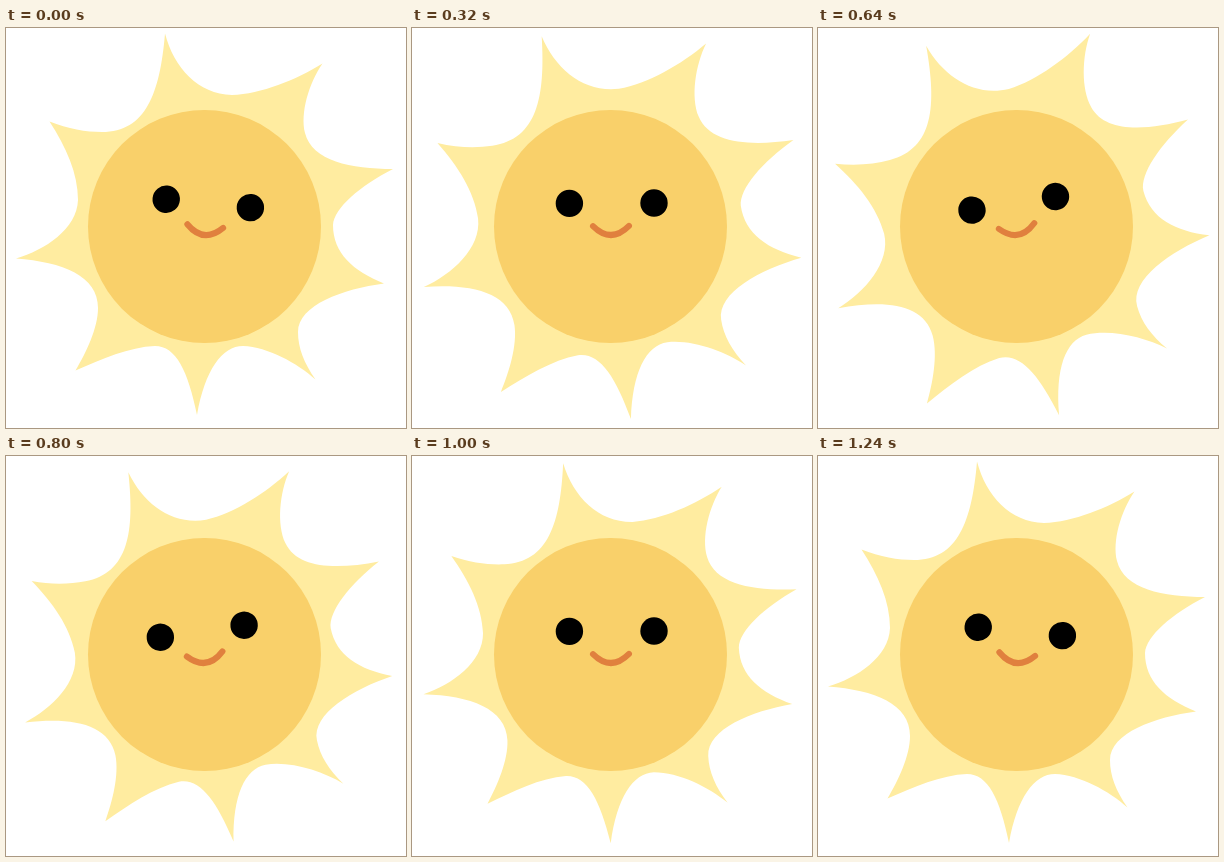
Write an HTML page that moves like this. It is 400 by 400 pixels and loops after 1.28 s.

```html
<!DOCTYPE html>
<html lang="en">
<head>
<meta charset="utf-8">
<title>Smiling sun</title>
<style>
  html, body { margin: 0; width: 100%; height: 100%; overflow: hidden; background: #fff; }
  svg { display: block; width: 100%; height: 100%; }
</style>
</head>
<body>
<svg viewBox="0 0 400 400">
  <path id="rays" fill="#ffeca0" d="M159 5.5
    C168 40 192 66 226 67 C255 66 290 52 316.5 35.5
    C303 55 294 85 299 105 C306 133 345 141 387 141
    C354 158 328 180 327 197 C327 225 347 243 378 255.5
    C337 261 292 277 292 304 C292 320 298 335 309.5 351.5
    C291 335 262 319 237 318 C216 318 199 342 191 387
    C182 343 170 318 149 318 C123 319 96 331 69.5 342.5
    C80 325 92 300 92 280 C92 248 57 234 10 230.5
    C39 222 71 201 72 172 C72 145 60 119 43.5 93.5
    C62 101 80 104 96 104 C140 104 154 65 159 5.5Z"/>
  <circle cx="198.5" cy="198.5" r="116.5" fill="#f9d06a"/>
  <g id="face">
    <circle cx="157.5" cy="175.2" r="13.7"/>
    <circle cx="242.1" cy="175.2" r="13.7"/>
    <path d="M181 198Q199 216 217 198" fill="none" stroke="#e0803e" stroke-width="6" stroke-linecap="round"/>
  </g>
</svg>
<script>
  const LOOP = 1280, STEP = 40;
  const rays = document.getElementById('rays');
  const face = document.getElementById('face');

  const ease = (t, from, to) => {
    const s = Math.min(1, Math.max(0, (t - from) / (to - from)));
    return s * s * (3 - 2 * s);
  };
  // Rises from 0 to 1, then returns to 0
  const swing = (t, a, b, c, d) => ease(t, a, b) - ease(t, c, d);

  function draw(now) {
    const t = Math.floor((now % LOOP) / STEP) * STEP;
    const turn = -15 * swing(t, 30, 570, 640, 1120);
    const size = 1 + 0.031 * swing(t, 65, 400, 560, 860);
    const tilt = 5.7 - 15.3 * swing(t, 40, 700, 700, 1220);
    rays.setAttribute('transform',
      `translate(198.5 198.5) rotate(${turn}) scale(${size}) translate(-198.5 -198.5)`);
    face.setAttribute('transform', `rotate(${tilt} 198.5 200.5)`);
  }

  const start = performance.now();
  function tick() {
    draw(performance.now() - start);
    requestAnimationFrame(tick);
  }
  tick();
</script>
</body>
</html>
```
